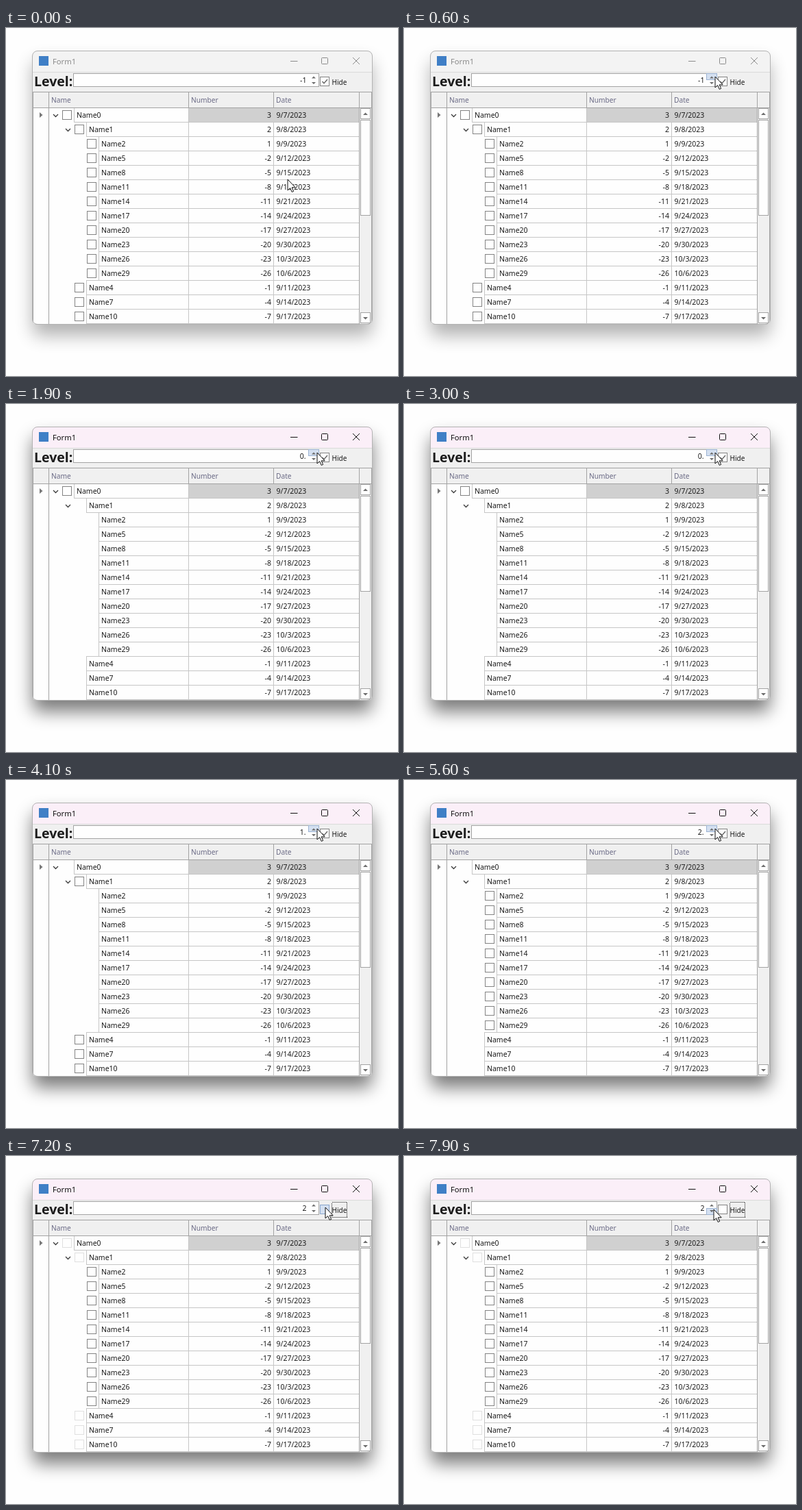
An HTML page for the animation above (8 s loop, 572 by 508 pixels).

```html
<!DOCTYPE html>
<html lang="en">
<head>
<meta charset="utf-8">
<title>Form1</title>
<style>
html, body { margin: 0; width: 100%; height: 100%; overflow: hidden; background: #fefefe; }
svg { display: block; }
text { font: 10.5px "Noto Sans", "Open Sans", sans-serif; fill: #1c1c1c; }
.end { text-anchor: end; }
.head { font-size: 10.2px; fill: #6b6b86; }
.level { font-size: 19.5px; font-weight: 700; }
.caption { font-size: 11.2px; }
.crisp { shape-rendering: crispEdges; }
.face { fill: #f0f0f0; }
.edge { stroke: #a3a3a3; fill: none; }
.cell { stroke: #c6c6c6; fill: #fefefe; }
.box { stroke: #848484; fill: #fefefe; }
.hot { fill: #d4e0f1; stroke: #9db3d2; }
.arrow { fill: #6c6c6c; }

/* every change is a hard cut on one shared 8 s clock */
.a { animation: 8s step-end infinite; }

.shadow { animation-name: shadow; }
@keyframes shadow { 0% { opacity: .3 } 16.25%, 100% { opacity: .52 } }

.title { animation-name: title; }
@keyframes title {
  0% { fill: #f3f3f3 } 17.5% { fill: #f6f2f5 }
  18.75% { fill: #f9f0f7 } 20%, 100% { fill: #fbeff8 }
}
.caption { animation-name: caption; }
@keyframes caption { 0% { fill: #8b8b8b } 16.25%, 100% { fill: #111 } }
.tools { fill: none; animation-name: tools; }
@keyframes tools { 0% { stroke: #8b8b8b } 16.25%, 100% { stroke: #111 } }

/* tree check boxes by depth */
.d0 { animation-name: d0; }
@keyframes d0 {
  0% { opacity: 1; stroke: #848484 } 45% { opacity: 0; stroke: #848484 }
  90%, 100% { opacity: 1; stroke: #e0e0e0 }
}
.d1 { animation-name: d1; }
@keyframes d1 {
  0% { opacity: 1; stroke: #848484 } 17.5% { opacity: 0 }
  45% { opacity: 1; stroke: #848484 } 63.75% { opacity: 0; stroke: #848484 }
  90%, 100% { opacity: 1; stroke: #e0e0e0 }
}
.d2 { animation-name: d2; }
@keyframes d2 { 0% { opacity: 1 } 17.5% { opacity: 0 } 63.75%, 100% { opacity: 1 } }

/* spin editor */
.minus { animation-name: minus; }
@keyframes minus { 0% { opacity: 1 } 17.5%, 100% { opacity: 0 } }
.zero { animation-name: zero; }
@keyframes zero { 0% { opacity: 0 } 17.5% { opacity: 1 } 45%, 100% { opacity: 0 } }
.one { animation-name: one; }
@keyframes one { 0% { opacity: 0 } 45% { opacity: 1 } 63.75%, 100% { opacity: 0 } }
.two { animation-name: two; }
@keyframes two { 0% { opacity: 0 } 63.75% { opacity: 1 } 87.5%, 100% { opacity: 0 } }
.late { animation-name: late; }
@keyframes late { 0% { opacity: 0 } 87.5%, 100% { opacity: 1 } }
.caret { animation-name: caret; }
@keyframes caret {
  0% { opacity: 0 } 18.75% { opacity: 1 } 23.75% { opacity: 0 } 30% { opacity: 1 }
  37.5% { opacity: 0 } 43.75% { opacity: 1 } 51.25% { opacity: 0 } 58.75% { opacity: 1 }
  70% { opacity: 0 } 76.25% { opacity: 1 } 83.75%, 100% { opacity: 0 }
}
.up { animation-name: up; }
@keyframes up {
  0% { opacity: 0 } 7.5% { opacity: 1; fill: #d4e0f1 }
  17.5% { opacity: 1; fill: #b3c8e6 } 20% { opacity: 1; fill: #d4e0f1 }
  43.75% { opacity: 1; fill: #b3c8e6 } 46.25% { opacity: 1; fill: #d4e0f1 }
  63.75% { opacity: 1; fill: #b3c8e6 } 66.25% { opacity: 1; fill: #d4e0f1 }
  80%, 100% { opacity: 0; fill: #d4e0f1 }
}
.down { animation-name: down; }
@keyframes down { 0% { opacity: 0 } 98.75%, 100% { opacity: 1 } }

/* Hide option */
.option { animation-name: option; }
@keyframes option {
  0% { fill: #fefefe; stroke: #848484 } 81.25% { fill: #d4e0f1; stroke: #8aa6cc }
  87.5% { fill: #b3c8e6; stroke: #7d9cc6 } 90% { fill: #d4e0f1; stroke: #8aa6cc }
  97.5%, 100% { fill: #fefefe; stroke: #848484 }
}
.tick { animation-name: tick; }
@keyframes tick { 0% { opacity: 1 } 90%, 100% { opacity: 0 } }

.pointer { animation-name: pointer; }
@keyframes pointer {
  0% { transform: translate(411px, 221px) }
  1.25% { transform: translate(413px, 212px) }
  2.5% { transform: translate(421px, 184px) }
  3.75% { transform: translate(434px, 139px) }
  5% { transform: translate(445px, 101px) }
  6.25% { transform: translate(452px, 79px) }
  7.5% { transform: translate(454px, 71px) }
  80% { transform: translate(460px, 73px) }
  81.25% { transform: translate(466px, 75px) }
  97.5% { transform: translate(457px, 77px) }
  98.75%, 100% { transform: translate(452px, 78px) }
}
</style>
</head>
<body>
<svg width="572" height="508" viewBox="0 0 572 508">
  <defs>
    <filter id="blur" x="-20%" y="-20%" width="140%" height="140%"><feGaussianBlur stdDeviation="13"/></filter>
    <clipPath id="frame"><rect x="38" y="33" width="497" height="400" rx="8"/></clipPath>
  </defs>
  <rect class="a shadow" x="39" y="49" width="495" height="400" rx="8" filter="url(#blur)"/>

  <g clip-path="url(#frame)">
    <rect class="a title" x="38" y="33" width="497" height="32"/>
    <rect class="face" x="39" y="64" width="495" height="369"/>
    <path class="crisp" d="M39 64.5H534" stroke="#dadada"/>

    <rect x="48" y="41" width="14" height="14" fill="#3f7fc6"/>
    <text class="a caption" x="68" y="53">Form1</text>
    <path class="a tools" d="M415 48.5H425.5M506 43L516 53M516 43L506 53"/>
    <rect class="a tools" x="460.5" y="43.5" width="9" height="9" rx="1"/>

    <text class="level" x="41" y="85">Level:</text>
    <rect class="crisp" x="98.5" y="66.5" width="358" height="19" fill="#fefefe" stroke="#a3a3a3"/>
    <rect class="a up hot crisp" x="441.5" y="66.5" width="15" height="9"/>
    <rect class="a down hot crisp" x="441.5" y="76.5" width="15" height="9"/>
    <path class="arrow" d="M446 73.5L449 70.5L452 73.5ZM446 79L449 82L452 79Z"/>
    <text class="a minus end" x="438.5" y="80">-1</text>
    <text class="a zero end" x="437.5" y="80">0.</text>
    <text class="a one end" x="437.5" y="80">1.</text>
    <text class="a two end" x="437.5" y="80">2.</text>
    <text class="a late end" x="438.5" y="80">2</text>
    <rect class="a caret crisp" x="428" y="69" width="1" height="13"/>

    <rect class="a option crisp" x="458.5" y="71.5" width="13" height="13"/>
    <path class="a tick" d="M461.5 78L464 80.8L469 75" fill="none" stroke="#666" stroke-width="1.4"/>
    <text x="475.5" y="83" style="font-size:10px">Hide</text>
    <rect class="a late crisp" x="475.5" y="67.5" width="22" height="22" fill="none" stroke="#222" stroke-dasharray="1 1"/>

    <rect x="40" y="117" width="476" height="315" fill="#fefefe"/>
    <g id="rows"></g>

    <rect class="face" x="40" y="94" width="493" height="22"/>
    <path class="edge crisp" d="M39 93.5H534M39 116.5H534M39.5 93V432M62.5 94V432M515.5 94V432M266.5 94V116M390.5 94V116M533.5 94V432M39 432.5H534"/>
    <text class="head" x="66" y="109">Name</text>
    <text class="head" x="270" y="109">Number</text>
    <text class="head" x="394" y="109">Date</text>
    <path d="M49 123L53.5 127L49 131Z" fill="#777"/>
    <path d="M69 126L72.5 129.5L76 126M87 147L90.5 150.5L94 147" fill="none" stroke="#3c3c3c" stroke-width="1.3"/>

    <g class="crisp" fill="#fefefe" stroke="#a3a3a3">
      <rect x="517.5" y="117.5" width="14" height="15"/>
      <rect x="517.5" y="134.5" width="14" height="139"/>
      <rect x="517.5" y="415.5" width="14" height="15"/>
    </g>
    <path class="arrow" d="M521 127L524.5 123.5L528 127ZM521 422L524.5 425.5L528 422Z"/>
  </g>
  <rect x="38.5" y="33.5" width="496" height="399" rx="7.5" fill="none" stroke="#b3b3b3"/>

  <path class="a pointer" d="M0 0V16L3.7 12.6L6.2 18.4L8.6 17.4L6.2 11.8H11.2Z" fill="#fff" stroke="#111" stroke-linejoin="round"/>
</svg>
<script>
const ids = [0, 1, 2, 5, 8, 11, 14, 17, 20, 23, 26, 29, 4, 7, 10];
const depthOf = i => i === 0 ? 0 : i === 1 || i > 11 ? 1 : 2;

function dateOf(id) {
  const day = 7 + id;
  return day > 30 ? `10/${day - 30}/2023` : `9/${day}/2023`;
}

const cell = (x, right, y, style = '') =>
  `<rect class="cell crisp" x="${x + .5}" y="${y - .5}" width="${right - x}" height="21" style="${style}"/>`;

function row(id, i) {
  const y = 117 + 21 * i, depth = depthOf(i), shift = 18 * depth;
  const fill = i ? '' : 'fill:#d0d0d0;stroke:#d0d0d0';
  return cell(266, 390, y, fill) + cell(390, 515, y, fill) + cell(99 + shift, 266, y) +
    `<rect class="a box crisp d${depth}" x="${82.5 + shift}" y="${y + 3.5}" width="13" height="13"/>
     <text x="${103 + shift}" y="${y + 14}">Name${id}</text>
     <text class="end" x="387" y="${y + 14}">${3 - id}</text>
     <text x="394.5" y="${y + 14}">${dateOf(id)}</text>`;
}

document.getElementById('rows').innerHTML = ids.map(row).join('');
</script>
</body>
</html>
```
